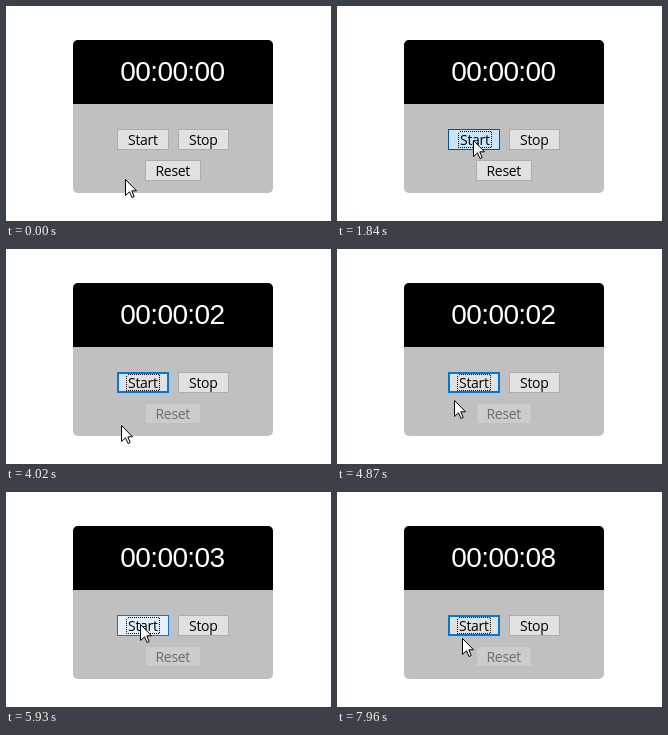
An HTML page for the animation above (8 s loop, 325x215 px).

```html
<!DOCTYPE html>
<html lang="en">
<head>
<meta charset="utf-8">
<title>Stopwatch</title>
<style>
  html, body { margin: 0; width: 100%; height: 100%; overflow: hidden; background: #fff; }
  svg { display: block; width: 325px; height: 215px; }
  .time { font: 28px "Liberation Sans", Arial, sans-serif; letter-spacing: -.6px; fill: #fff; }
  .btn text { font: 14px "Open Sans", "Noto Sans", sans-serif; letter-spacing: -.3px; }
  .face { fill: #e1e1e1; stroke: #adadad; }
  .inner { fill: none; }
  .ring { fill: none; stroke: #000; stroke-dasharray: 1 1; stroke-dashoffset: 1; shape-rendering: crispEdges; visibility: hidden; }
  .focus .ring { visibility: visible; }
  .focus .face, .focus .inner { stroke: #0078d7; }
  .hover .face { fill: #e5f1fb; stroke: #0078d7; }
  .press .face { fill: #cce4f7; stroke: #005499; }
  .hover .inner { stroke: none; }
  .off .face { fill: #ccc; stroke: #bfbfbf; }
  .off text { fill: #6d6d6d; }
</style>
</head>
<body>
<svg viewBox="0 0 325 215">
  <rect x="67" y="34" width="200" height="153" rx="5" fill="#c0c0c0"/>
  <path d="M67 98V39a5 5 0 0 1 5-5H262a5 5 0 0 1 5 5V98Z"/>
  <text class="time" id="time" x="114.3" y="75">00:00:00</text>
  <g class="btn" id="start">
    <rect class="face" x="111.5" y="123.5" width="51" height="20"/>
    <rect class="inner" x="112.5" y="124.5" width="49" height="18"/>
    <g id="label">
      <path class="ring" d="M120.5 125.5h33v16M153.5 141.5h-33v-16"/>
      <text x="122" y="139">Start</text>
    </g>
  </g>
  <g class="btn">
    <rect class="face" x="172.5" y="123.5" width="50" height="20"/>
    <text x="183" y="139">Stop</text>
  </g>
  <g class="btn" id="reset">
    <rect class="face" x="139.5" y="154.5" width="55" height="20"/>
    <text x="149.5" y="170">Reset</text>
  </g>
  <path id="cursor" d="M.5 .5V16.5L4.5 12.8 7 18.5 9.2 17.5 6.8 11.8H11.5Z" fill="#fff" stroke="#000"/>
</svg>
<script>
const LOOP = 8000, STEP = 65, SECOND = 980;
const $ = id => document.getElementById(id);

// pointer strokes: first step, last step, resting place
const moves = [
  { from: 70, to: 70, x: 119, y: 175 },
  { from: 1020, to: 1490, x: 136, y: 134 },
  { from: 2360, to: 2490, x: 115, y: 176 },
  { from: 4330, to: 4520, x: 115, y: 158 },
  { from: 4870, to: 4870, x: 117, y: 151 },
  { from: 4930, to: 5130, x: 134, y: 132 },
  { from: 6200, to: 6470, x: 125, y: 150 },
  { from: 7640, to: 7700, x: 125, y: 147 },
  { from: 7840, to: 7840, x: 125, y: 146 }
];
const clicks = [{ down: 1840, up: 2020 }, { down: 5730, up: 5930 }];
// each click on Start sets off its own ticking interval
const firstTicks = [3040, 6920];

const ease = p => p * p * (3 - 2 * p);

function pointer(t) {
  let x = 119, y = 173;
  for (const m of moves) {
    if (t < m.from) break;
    const steps = Math.round((m.to - m.from) / STEP) + 1;
    const gap = (m.to - m.from) / (steps - 1 || 1) || 1;
    const done = Math.min(steps, Math.floor((t - m.from) / gap + 1e-6) + 1);
    const p = ease(done / steps);
    x += (m.x - x) * p;
    y += (m.y - y) * p;
  }
  return [Math.round(x), Math.round(y)];
}

function draw(t) {
  const [x, y] = pointer(t);
  $("cursor").setAttribute("transform", `translate(${x} ${y})`);

  const pressed = clicks.some(c => t >= c.down && t < c.up);
  const start = $("start").classList;
  start.toggle("focus", t >= clicks[0].down);
  start.toggle("hover", x >= 111 && x < 163 && y >= 123 && y < 144);
  start.toggle("press", pressed);
  $("label").setAttribute("transform", `translate(${pressed ? 1 : 0} 0)`);
  $("reset").classList.toggle("off", t >= clicks[0].up);

  const count = firstTicks.reduce((n, k) => n + Math.max(0, Math.floor((t - k) / SECOND) + 1), 0);
  $("time").textContent = "00:00:" + String(count).padStart(2, "0");
}

const begin = performance.now();
function frame() {
  draw((performance.now() - begin) % LOOP);
  requestAnimationFrame(frame);
}
draw(0);
requestAnimationFrame(frame);
</script>
</body>
</html>
```
